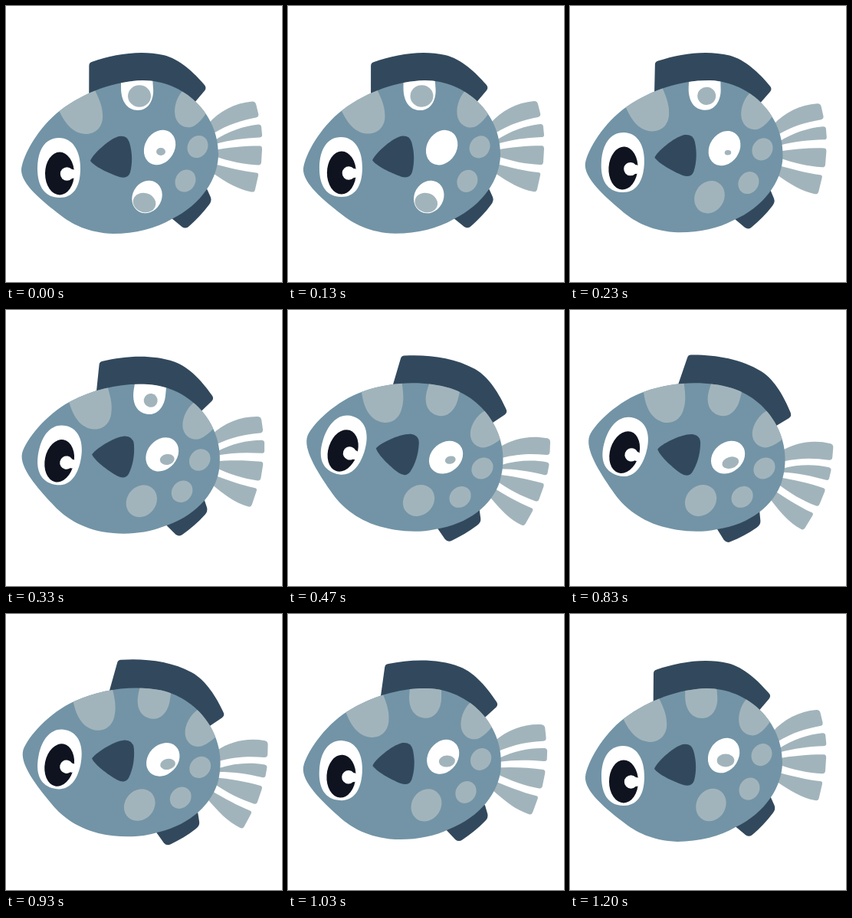
These frames come from a looping animation (360 px wide and 360 px high, 1230 ms). An HTML page with a canvas:

```html
<!DOCTYPE html>
<html lang="en">
<head>
<meta charset="utf-8">
<title>Swimming fish</title>
<style>
html, body { margin: 0; width: 100%; height: 100%; overflow: hidden; background: #fff; }
canvas { display: block; width: 360px; height: 360px; }
</style>
</head>
<body>
<canvas id="stage" width="360" height="360"></canvas>
<script>
const ctx = document.getElementById('stage').getContext('2d');
const LOOP = 1230, RISE_AT = 25, FALL_AT = 660, SWING = 590;
const BODY_LAG = 13, FIN_LAG = 56, EYE_LEAD = 7;
const MAX_ANGLE = 19.4 * Math.PI / 180;
const PIVOT = { x: 179, y: 206 };
const BODY = '#7294a6', DARK = '#32495d', LIGHT = '#a2b4bb', WHITE = '#fff', BLACK = '#0e131f';

const body = new Path2D('M20 213C22 195 42 158 71 136C103 112 142 98 178 97C232 97 277 140 277 193C277 225 255 259 216 278C196 290 168 297 140 297C107 296 85 284 70 272C48 255 19 232 20 213Z');
const fins = [
  'M108 118L108 78Q108 74 112 73C140 63 175 57 205 64C226 69 245 87 258 102Q262 106 259 110L243 129L180 150Z',
  'M262 238L267 249Q269 254 265 259C257 270 248 279 239 287Q235 291 230 288L214 275L240 245Z'
].map(d => new Path2D(d));
const tail = [
  'M264 153C278 137 298 126 321 124Q325 124 326 128L329 140Q330 144 326 145C306 149 290 154 270 166Z',
  'M272 175C290 163 310 156 329 154Q333 154 333 158L334 168Q334 171 330 171C310 172 293 174 272 180Z',
  'M270 188C290 184 312 182 331 182Q334 182 334 186L333 203Q333 207 329 207C310 206 293 203 270 195Z',
  'M272 206C292 211 308 215 326 217Q330 217 329 221L325 239Q324 243 320 242C303 239 288 230 270 218Z'
].map(d => new Path2D(d));
const sideSpots = [
  'M68 134C76 152 87 167 105 167C122 166 127 152 126 142C126 130 120 118 114 106Z',
  'M230 111C222 120 218 134 221 145C225 158 238 161 246 156C252 152 257 146 261 140L250 112Z'
].map(d => new Path2D(d));
const topSpot = new Path2D('M150 94L150 107C150 124 158 136 172 136C187 136 193 121 192 108L191 94Z');
const cheek = new Path2D('M110 202C112 195 133 174 147 170Q158 168 161 178C165 192 165 205 162 217Q159 226 148 223C133 218 115 209 110 202Z');
const eyeWhite = new Path2D('M69 172C87 172 97 189 97 212C97 237 87 250 70 250C51 250 41 236 41 212C41 188 51 172 69 172Z');

// time, x, y, rx, ry of the mark inside the white spot
const marks = [
  [0, 202, 190, 6, 5], [110, 203, 190, 0, 0], [150, 203, 190, 0, 0],
  [330, 208, 190, 9.5, 7], [470, 207, 186, 7, 5], [670, 202, 192, 13, 8],
  [930, 208, 189, 10, 7], [1200, 203, 191, 11.5, 8.5], [LOOP, 202, 190, 6, 5]
];

function ease(u) {
  return u < 0.5 ? 4 * u ** 3 : 1 - 4 * (1 - u) ** 3;
}

function progress(t) {
  return ease(Math.max(0, Math.min(1, t / SWING)));
}

function swing(t) {
  const s = (t - RISE_AT + LOOP) % LOOP;
  return MAX_ANGLE * (progress(s) - progress(s - (FALL_AT - RISE_AT)));
}

function markAt(t) {
  const i = marks.findIndex(m => m[0] > t);
  const a = marks[i - 1], b = marks[i];
  const k = (t - a[0]) / (b[0] - a[0]);
  return a.map((v, j) => v + (b[j] - v) * k);
}

function fill(color, path) {
  ctx.fillStyle = color;
  ctx.fill(path);
}

function oval(color, x, y, rx, ry, tilt = 0) {
  ctx.fillStyle = color;
  ctx.beginPath();
  ctx.ellipse(x, y, rx, ry, tilt, 0, Math.PI * 2);
  ctx.fill();
}

function turned(angle, draw) {
  ctx.save();
  ctx.translate(PIVOT.x, PIVOT.y);
  ctx.rotate(angle);
  ctx.translate(-PIVOT.x, -PIVOT.y);
  draw();
  ctx.restore();
}

function drawSpots(t, angle) {
  ctx.save();
  ctx.clip(body);
  sideSpots.forEach(p => fill(LIGHT, p));
  const hollowTop = t < 400;
  fill(hollowTop ? WHITE : LIGHT, topSpot);
  if (hollowTop) {
    const r = 15 - 6 * Math.max(0, Math.min(1, (t - 130) / 200));
    oval(LIGHT, 174, 117.5, r, r * 0.9 + 0.8);
  }
  ctx.restore();

  oval(LIGHT, 250, 183.5, 13, 15, 0.5);
  oval(LIGHT, 234, 228, 13, 15, 0.5);

  const hollowLow = t < 230;
  oval(hollowLow ? WHITE : LIGHT, 184, 249, 19, 22, 0.5);
  if (hollowLow) oval(LIGHT, 180.5, 256.5, 15, 12.5, 0.3);

  oval(WHITE, 200.5, 184.5, 19.3, 24, 0.55);
  const [, x, y, rx, ry] = markAt(t);
  if (rx > 0.5) oval(LIGHT, x, y, rx, ry, -1.9 * angle);
}

function drawFace() {
  fill(DARK, cheek);
  fill(WHITE, eyeWhite);
  oval(BLACK, 70, 218.5, 19, 28);
  oval(WHITE, 79.5, 219, 8.7, 8.7);
  oval(WHITE, 87, 219, 4, 6);
}

function render(t) {
  ctx.fillStyle = WHITE;
  ctx.fillRect(0, 0, 360, 360);
  turned(swing(t - FIN_LAG), () => {
    tail.forEach(p => fill(LIGHT, p));
    fins.forEach(p => fill(DARK, p));
  });
  const angle = swing(t - BODY_LAG);
  turned(angle, () => {
    fill(BODY, body);
    drawSpots(t, angle);
  });
  turned(swing(t + EYE_LEAD), drawFace);
}

const begin = performance.now();
function tick() {
  render((performance.now() - begin) % LOOP);
  requestAnimationFrame(tick);
}
tick();
</script>
</body>
</html>
```
